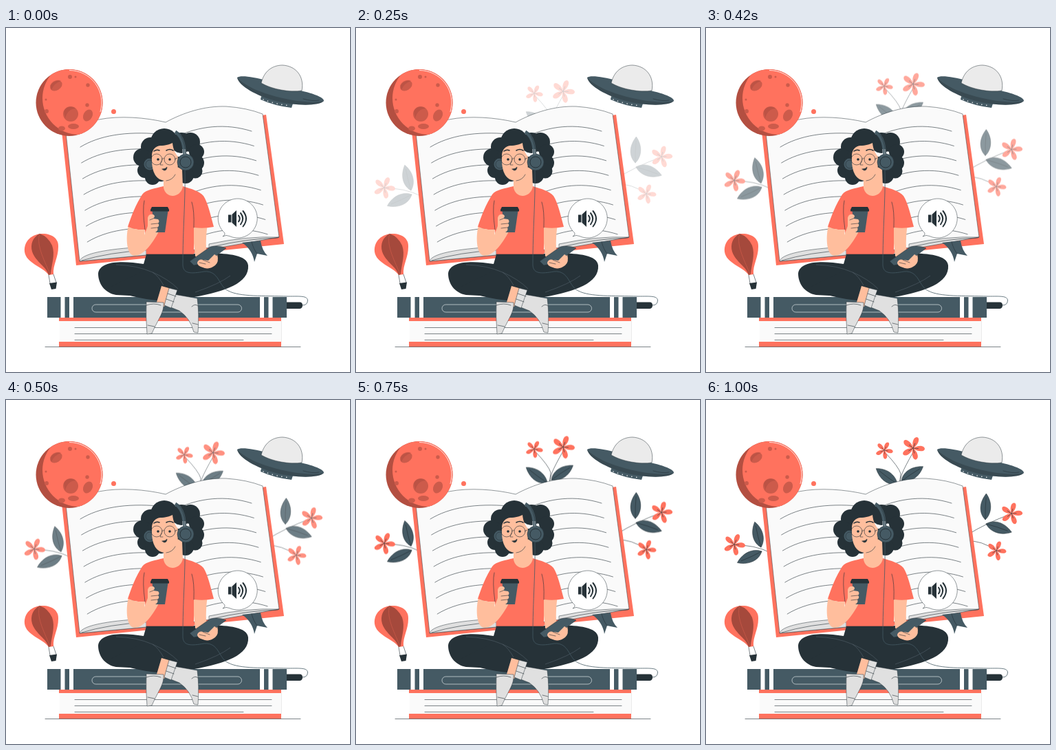
Write an HTML page that moves like this. It is 500x500 px and loops after 1.04 s.

```html
<!DOCTYPE html>
<html lang="en">
<head>
<meta charset="utf-8">
<title>Audiobook</title>
<style>
  html, body { margin: 0; width: 100%; height: 100%; overflow: hidden; background: #fff; }
  svg { display: block; width: 100vw; height: 100vh; }
  .coral { fill: #ff725e; }
  .slate { fill: #455a64; }
  .dark { fill: #263238; }
  .skin { fill: #ffbe9d; }
  .page { fill: #fafafa; }
  .grey { fill: #e0e0e0; }
  .crater { fill: #cc5b4b; }
  .line { fill: none; stroke: #263238; stroke-width: .6; stroke-linecap: round; stroke-linejoin: round; }
  .edge { stroke: #263238; stroke-width: .5; stroke-linejoin: round; }
</style>
</head>
<body>
<svg viewBox="0 0 500 500">
  <defs>
    <g id="petal">
      <path class="coral" d="M0 0C-3-4-5-10-3-14Q0-18 2.500-14.500C4.500-10 3-4 0 0Z"/>
      <path class="line" d="M0 0V-7"/>
    </g>
    <g id="flower"></g>
    <g id="leaf">
      <path class="slate edge" d="M0 0C-9-8-11-23 0-38C10-25 9-9 0 0Z"/>
      <path class="line" d="M0 0Q-1-16 0-32"/>
    </g>
    <clipPath id="globe"><circle cx="92" cy="108.500" r="48.500"/></clipPath>
  </defs>

  <g class="plant">
    <path class="line" d="M261 77Q280 97 283 107L281 125M301 76Q289 97 285 107L280 125"/>
    <use href="#leaf" transform="translate(278 122) rotate(-54)"/>
    <use href="#leaf" transform="translate(284 118) rotate(56)"/>
    <use href="#flower" transform="translate(259 73) rotate(28) scale(.8)"/>
    <use href="#flower" transform="translate(301 70) rotate(22) scale(1.060)"/>
  </g>
  <g class="plant">
    <path class="line" d="M442 166Q405 180 380 196M380 205Q401 204 420 218"/>
    <use href="#leaf" transform="translate(406 174) rotate(2)"/>
    <use href="#leaf" transform="translate(407 180) rotate(108) scale(1.030)"/>
    <use href="#flower" transform="translate(444 165) rotate(16)"/>
    <use href="#flower" transform="translate(422 219) rotate(22) scale(.9)"/>
  </g>
  <g class="plant">
    <path class="line" d="M41 211Q70 210 94 222"/>
    <use href="#leaf" transform="translate(80 214) rotate(-14)"/>
    <use href="#leaf" transform="translate(81 220) rotate(-115) scale(1.030)"/>
    <use href="#flower" transform="translate(41 210) rotate(24)"/>
  </g>

  <g id="book">
    <path class="coral" d="M81 150L102 345L404 314L378 126L366 128L232 170Z"/>
    <path class="page edge" d="M87 152Q108 138 135 133C165 127 203 130 232 137C258 123 288 113 320 114Q350 116 373 125L397 304L250 326L107 339Z"/>
    <path class="grey edge" d="M107 339C110 326 160 320 204 318V330Z"/>
    <path class="grey edge" d="M397 304Q350 302 295 314V322Z"/>
    <path class="line" d="M110 338Q150 326 203 323M395 305Q350 306 300 318"/>
    <path class="slate" d="M343 312L370 309Q372 323 380 331L365 328L361 340Q358 322 343 312Z"/>
    <path class="line" d="M357 311Q360 322 365 328"/>
  </g>

  <g id="planet">
    <g clip-path="url(#globe)">
      <path fill="#b34f41" d="M40 55H145V160H40Z"/>
      <circle class="coral" cx="106" cy="102" r="53"/>
      <g class="crater">
        <circle cx="94" cy="125" r="11"/>
        <ellipse cx="119" cy="127" rx="6.500" ry="9" transform="rotate(28 119 127)"/>
        <ellipse cx="73" cy="84" rx="9.500" ry="6.500" transform="rotate(-32 73 84)"/>
        <ellipse cx="98" cy="143" rx="8" ry="4"/>
        <ellipse cx="81" cy="146" rx="5" ry="3.500"/>
        <circle cx="93" cy="71" r="3"/><circle cx="101" cy="71" r="1.500"/>
        <circle cx="119" cy="83" r="2.700"/><circle cx="118" cy="112" r="2.700"/>
        <circle cx="58" cy="104" r="1.500"/><circle cx="59" cy="121" r="3"/>
      </g>
      <path fill="#b34f41" opacity=".6" d="M64 84A10 7-32 0 1 80 77Q70 80 66 90ZM84 121A11 11 0 0 1 101 117Q89 118 86 132Z"/>
    </g>
    <path fill="none" stroke="#fff" stroke-width=".8" d="M92 61.500A47 47 0 0 1 137 122"/>
    <circle class="coral" cx="156.500" cy="121.500" r="3.500"/>
  </g>

  <g id="saucer">
    <path class="slate" d="M371 99L417 110L415 116Q390 113 370 104Z"/>
    <path fill="none" stroke="#fff" stroke-width="1.600" stroke-linecap="round" stroke-dasharray="0 7" d="M374 104Q392 111 414 113"/>
    <path class="slate" d="M336 72C340 68 360 71 378 76L432 92C450 96 463 102 462 106C455 114 418 113 392 106C365 99 338 84 336 72Z"/>
    <path class="dark" opacity=".4" d="M336 72C347 85 375 96 402 102C428 108 450 109 462 106C455 114 418 113 392 106C365 99 338 84 336 72Z"/>
    <path fill="#ebebeb" class="edge" d="M371 80C375 62 388 54 402 54C421 55 434 70 430 91C413 94 386 89 371 80Z"/>
    <path class="line" d="M432 103Q446 107 455 105"/>
  </g>

  <g id="balloon">
    <path class="coral" d="M27 325C26 309 38 300 51 299C66 298 77 306 76 318C76 334 68 344 69 358L62 359C54 347 29 342 27 325Z"/>
    <path fill="#a5493c" d="M49 299C39 304 35 314 38 325C43 340 59 347 62 359L65 358C66 343 72 330 67 316Q61 303 49 299Z"/>
    <path fill="none" stroke="#c95848" stroke-width=".8" d="M49 299C43 316 58 342 64 358"/>
    <path class="line" d="M62 359L64 371M69 358L73 370"/>
    <path class="dark" d="M63 371L74 369.500L72.500 379L66 380Z"/>
  </g>

  <g id="shelf">
    <path class="page" d="M78 421H400V463H78Z"/>
    <path class="coral" d="M77 421H400V426H77ZM77 456H400V463.500H77Z"/>
    <path class="line" d="M100 435.500H386M100 444.500H386M100 453.500H345M57 463.500H428"/>
    <path stroke="#ddd" stroke-width=".6" d="M400.500 426V456"/>
    <path class="slate" d="M60 391H408V421H60Z"/>
    <path fill="#fff" d="M79.500 391H85.500V421H79.500ZM92 391H98V421H92ZM369 391H375V421H369ZM381.500 391H387.500V421H381.500Z"/>
    <rect fill="none" stroke="#dfe5e7" stroke-width=".7" x="125" y="402" width="217.500" height="11" rx="5.500"/>
    <path class="dark" d="M408 398.500H427Q431 398.500 431 403T427 408H408Z"/>
  </g>

  <g id="reader">
    <g class="dark">
      <path d="M204 329L276 328C305 327 350 326 352 345C354 371 318 383 274 391L237 392L160 388C143 385 134 371 134 357C136 338 170 338 200 343Z"/>
      <path d="M148 378Q180 392 226 397L244 376L206 350Z"/>
    </g>
    <path fill="none" stroke="#52616a" stroke-width=".6" d="M160 344Q190 345 213 355T250 379M275 384Q310 372 326 360M213 355Q222 361 229 374"/>

    <path class="skin" d="M226 375L240 379L230 405L218 402Z"/>
    <path class="grey edge" d="M204 398L229 399C230 414 222 421 212 444L205 445Q203 420 204 398Z"/>
    <path class="grey edge" d="M244 387L278 393Q281 415 279 443L273 442Q268 422 252 411L237 405Z"/>
    <path class="grey edge" d="M237 378L249 381L240 407L230 403Z"/>
    <path class="line" d="M235 386L247 390M233 394L244 398M204 403Q215 399 225 403M206 432L216 434M270 405Q275 400 279 404M271 429L279 431"/>

    <path class="skin" d="M270 286L293 284Q290 306 291 321L307 329Q310 340 304 345Q294 353 284 346L275 331Z"/>

    <path class="coral" d="M229 230C217 233 203 235 198 242C189 256 182 273 177 289Q188 294 202 293L204 329H273L273 290Q288 292 302 289C297 270 293 253 287 244C281 237 270 234 257 230Z"/>
    <path class="line" d="M202 293Q198 264 201 251M273 290Q274 265 270 253M204 329H273"/>
    <path class="skin" d="M177.500 289C174 305 175 331 187 331C199 331 212 315 222 296L208 282Q204 294 201 301L202 293Q188 294 177.500 289Z"/>

    <g class="dark">
      <circle cx="230" cy="166" r="20"/><circle cx="210" cy="173" r="14"/><circle cx="198" cy="188" r="13"/>
      <circle cx="202" cy="207" r="11"/><circle cx="213" cy="217" r="11"/><circle cx="255" cy="167" r="15"/>
      <circle cx="268" cy="166" r="14"/><circle cx="277" cy="180" r="11"/><circle cx="276" cy="196" r="12"/>
      <circle cx="275" cy="208" r="10.500"/><circle cx="261" cy="214" r="12"/><circle cx="242" cy="205" r="20"/>
      <circle cx="225" cy="198" r="25"/>
    </g>
    <circle class="slate" cx="209" cy="198" r="8.500"/>
    <circle class="line" cx="209" cy="198" r="6"/>
    <path class="skin" d="M229 212L229 232C232 248 253 248 257 231L256 205L244 200Z"/>
    <path class="skin" d="M212 186C212 177 217 172 224 171C232 171 238 169 242 167C243 178 247 183 250 187L250 196C250 210 244 222 233 222C219 222 211 211 212 186Z"/>
    <path class="line" d="M233 222Q242 221 246 213"/>
    <path fill="none" stroke="#455a64" stroke-width="5" d="M246 151C258 158 259 174 260 186"/>
    <path class="line" d="M251 153Q259 160 261 181"/>
    <circle class="slate edge" cx="261" cy="195" r="12"/>
    <circle fill="none" stroke="#263238" cx="261" cy="195" r="8"/>
    <path fill="none" stroke="#d7dfe2" stroke-width=".7" d="M257 176V184M260 176V184"/>

    <g class="line">
      <circle cx="219" cy="191" r="8"/><circle cx="238" cy="191" r="8"/>
      <path d="M227 190Q229 188 230 190M246 190L252 188M211 190L208 189M226 193L224 199L228 199"/>
      <path stroke-width="1.500" d="M215 179Q219 176 223 178M233 178Q238 175 243 178"/>
      <path class="dark" d="M227 205Q232 205 234 202Q234 207 230 207Z"/>
    </g>
    <circle class="dark" cx="221" cy="191" r="1.800"/>
    <circle class="dark" cx="238" cy="191" r="1.800"/>

    <path class="slate" d="M212.500 266H235.500L231 297H216Z"/>
    <path class="dark" d="M212 260H235L237 264V266.500H210V264Z"/>
    <path class="skin" d="M206 276Q207 270 214 271Q218 273 214 277L221 278Q224 281 221 284Q224 287 220 290Q222 294 217 297L206 299Z"/>
    <path class="line" d="M214 277L209 279M221 284L211 285M220 290L211 291"/>

    <path class="slate edge" d="M267 339L297 318Q308 315 320 320L292 341L273 345Z"/>
    <path class="skin" d="M278 341Q280 335 287 337L294 338L303 329Q308 331 304 338L302 345Q294 352 286 348Q278 346 278 341Z"/>
    <path class="line" d="M281 341L290 343M286 337L296 341"/>
    <path fill="none" stroke="#455a64" stroke-width=".8" d="M260 207C261 250 257 290 257 345C258 358 270 357 288 354C310 352 309 376 323 382C340 391 375 389 410 390C428 390 438 389 438.500 396Q438 403 431 403"/>
  </g>

  <g id="bubble">
    <path fill="#fff" class="edge" d="M318 298A28.500 28.500 0 1 1 325 302.500Q320 300 315 303Q319 301 318 298Z"/>
    <path class="dark" d="M323 271.500H327.500V282.500H323ZM328.500 271L335 265V289L328.500 283Z"/>
    <path fill="none" stroke="#263238" stroke-width="2" stroke-linecap="round" d="M338 272.500Q341.500 277 338 281.500M341 269Q347.500 277 341 285.500M344.500 266Q353.500 277 344.500 288.500"/>
  </g>
</svg>
<script>
  const NS = 'http://www.w3.org/2000/svg';
  const add = (parent, tag, attrs) => {
    const el = document.createElementNS(NS, tag);
    for (const key in attrs) el.setAttribute(key, attrs[key]);
    document.querySelector(parent).append(el);
  };

  for (let i = 0; i < 5; i++) add('#flower', 'use', { href: '#petal', transform: `rotate(${i * 72})` });

  // Ruled text on both pages
  for (let i = 0; i < 8; i++) {
    const x = 108 + i * 1.7, y = 173 + i * 23;
    if (i < 7) add('#book', 'path', { class: 'line', d: `M${x} ${y}c28-17 66-23 114-19` });
    const rx = 357 + i * 3.3, ry = 150 + i * 21.4;
    add('#book', 'path', { class: 'line', d: `M${rx} ${ry}c-38-12-76-8-112 9` });
  }

  // Plants rise with a slight overshoot, held at 24 pictures a second
  const LOOP = 1040, FPS = 24;
  const starts = Array.from({ length: 25 }, (_, i) => Math.round(i * 100 / FPS) * 10);
  const rises = [...document.querySelectorAll('.plant')].map(plant => {
    const rise = plant.animate(
      [{ opacity: 0, transform: 'translateY(30px)' }, { opacity: 1, transform: 'translateY(0px)' }],
      { duration: 1000, fill: 'both', easing: 'cubic-bezier(.36, -.01, .5, 1.38)' });
    rise.pause();
    return rise;
  });
  function draw() {
    const t = performance.now() % LOOP;
    const step = starts.filter(s => s <= t).length - 1;
    const time = step ? (step + .5) * 1000 / FPS : 0;
    for (const rise of rises) rise.currentTime = time;
    requestAnimationFrame(draw);
  }
  draw();
</script>
</body>
</html>
```
